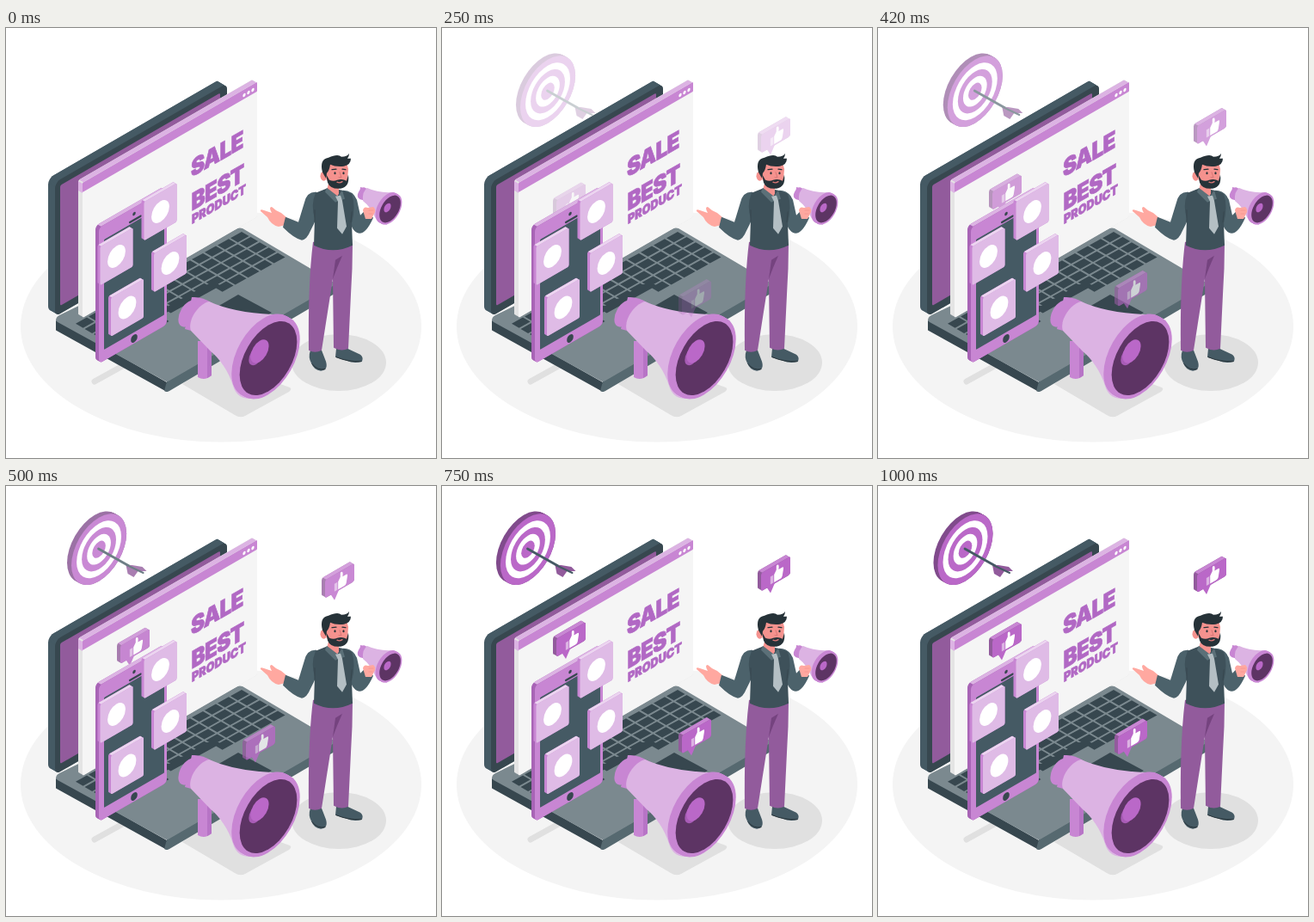
Animation, 500 px wide and 500 px high, one loop 1.04 s. Source, as an HTML page:

```html
<!DOCTYPE html>
<html lang="en">
<head>
<meta charset="utf-8">
<title>Best product sale</title>
<style>
  html, body { margin: 0; width: 100%; height: 100%; overflow: hidden; background: #fff; }
  svg { display: block; width: 100vw; height: 100vh; }
  text { font-family: Inter, "Open Sans", sans-serif; font-weight: 900; fill: #b168c4; stroke: #b168c4; stroke-width: .7; }
</style>
</head>
<body>
<svg id="stage" viewBox="0 0 500 500"></svg>
<script>
const SLOPE = 0.577;
const purple = '#ba68c8', mid = '#c886d3', pale = '#dcb3e3', deep = '#925b9c', plum = '#5d3464';
const ink = '#37474f', slate = '#455a64', night = '#263238', skin = '#ffa8a0', face = '#f5928e';

// Shapes on the left-facing isometric plane
const iso = (x, y) => `matrix(.866 -.5 0 1 ${x} ${y})`;
const path = (d, fill, extra = '') => `<path d="${d}" fill="${fill}" ${extra}/>`;
const line = (d, stroke, width) =>
  `<path d="${d}" fill="none" stroke="${stroke}" stroke-width="${width}" stroke-linecap="round" stroke-linejoin="round"/>`;
const ellipse = (x, y, rx, ry, fill) => `<ellipse cx="${x}" cy="${y}" rx="${rx}" ry="${ry}" fill="${fill}"/>`;
const disc = (x, y, r, fill) => `<circle r="${r}" transform="${iso(x, y)}" fill="${fill}"/>`;
const panel = (x, y, w, h, r, fill) =>
  `<rect width="${w / 0.866}" height="${h}" rx="${r}" transform="${iso(x, y)}" fill="${fill}"/>`;
const label = (x, y, size, spacing, words) =>
  `<text transform="${iso(x, y)}" font-size="${size}" letter-spacing="${spacing}">${words}</text>`;

// Repeats a shape from the rear position towards the viewer
function sweep(x, y, depth, shape) {
  let out = '';
  for (let i = 0; i <= depth; i++) out += shape(x + i, y + i * SLOPE);
  return out;
}

// A thick panel: (x, y) is the rear top-left corner, d the depth
function slab(x, y, w, h, d, r, front, side, top) {
  const x1 = x + r / 2, x2 = x + w - r / 2, y1 = y - r / 2 * SLOPE, y2 = y - (w - r / 2) * SLOPE, e = d * SLOPE;
  return sweep(x, y, d, (px, py) => panel(px, py, w, h, r, side)) +
    path(`M${x1} ${y1}L${x2} ${y2}L${x2 + d} ${y2 + e}L${x1 + d} ${y1 + e}Z`, top) +
    panel(x + d, y + e, w, h, r, front);
}

function keyboard() {
  let keys = '';
  for (let row = 0; row < 5; row++) {
    for (let col = 0; col < 13; col++) {
      if (row === 4 && col > 4 && col < 9) continue;
      keys += `M${274 + row * 10.5 - col * 15} ${237 + row * 6.1 + col * 8.3}l8.6 5l-13 7.2l-8.6 -5z`;
    }
  }
  return path(keys + 'M241 294.5l8.6 5l-58 32l-8.6 -5z', ink);
}

function laptop() {
  return path('M59 341L187 413V422L59 351Z', ink, `stroke="${ink}" stroke-width="2" stroke-linejoin="round"`) +
    path('M187 411L382 298V309L190 422Q187 424 184 422Z', '#566970') +
    path('M58 340Q58 336 62 334L269 233Q272 232 275 233L380 295Q384 298 380 300L190 410Q187 412 184 410L60 342Z', '#7b898f') +
    keyboard() + path('M270 310L309 331L270 354L232 332Z', ink) +
    slab(49, 175, 200, 156, 8, 7, ink, slate, slate) +
    panel(63, 183, 186, 140, 2, deep);
}

function browser() {
  const dots = [0, 1, 2].map(i => disc(277 + 5 * i, 78 - 3 * i, 1.9, '#fff')).join('');
  return slab(84, 177, 203, 157, 5, 2, '#f5f5f5', '#e4e4e4', pale) +
    path('M84 178L89 181V192L84 189Z', pale) + panel(89, 180, 203, 11, 1, mid) + dots +
    label(215, 174, 28, -0.7, 'SALE') + label(215.5, 213, 28, -0.7, 'BEST') + label(216, 228, 14.6, 0, 'PRODUCT');
}

const tile = (x, y) => slab(x, y, 38, 45, 3, 2, '#dfbbe6', mid, '#ecd5f0') + disc(x + 22, y + 13, 12, '#fff');

function phone() {
  return slab(104, 230, 79, 158, 4, 5, mid, '#a864b6', pale) +
    panel(114, 246, 70, 128, 1, slate) +
    line('M144 226L157 218.5', ink, 2.2) + disc(149, 216, 2, ink) + disc(149, 361, 4.4, ink) +
    tile(157.5, 200.5) + tile(106.5, 252.5) + tile(169, 260.5) + tile(119, 312);
}

function bigMegaphone() {
  return path('M223 364H239V404Q231 411 223 406Z', mid) + path('M234 372H239V404L234 407Z', '#b774c6') +
    path('M216 313Q228 312 240 320L229 353Q219 354 208 350Z', mid) + disc(212.5, 332, 14, mid) +
    path('M236 318Q265 331 309 333L335 340L282 431Q268 430 264 416C259 399 248 384 238 376L215 352C211 339 224 321 236 318Z', pale) +
    sweep(299.5, 380.5, 5, (x, y) => disc(x, y, 43, mid)) + disc(305, 384, 38.5, plum) +
    disc(291, 381, 10, '#a85cb6') + disc(295, 376, 12.2, purple);
}

function smallMegaphone() {
  return disc(414, 192, 6, mid) + path('M412 185L421 187L418 201L411 199Z', mid) +
    path('M420 186Q433 192 449 191L443 229Q433 228 429 220Q424 208 415 201Q414 190 420 186Z', pale) +
    sweep(443.5, 209, 3, (x, y) => disc(x, y, 16, mid)) + disc(446.5, 210.5, 14.2, plum) + disc(443.5, 209, 4.7, purple);
}

function man() {
  const shoes = path('M353 374H366L371 387Q374 397 365 398Q357 397 354 389Q350 382 353 374Z', slate) +
    path('M383 372H396L411 379Q415 382 413 387Q404 390 395 386L382 382Z', slate) +
    line('M355 390Q361 398 370 396M383 382Q397 388 412 387', night, 1);
  const legs = path('M356 248L402 250Q402 279 400 309L397 372Q389 376 380 371L379 291L366 374Q358 378 351 374Q350 297 356 248Z', deep) +
    path('M379 291L382 269L390 264L384 278Z', '#75437f');
  const openHand = path('M325 229L317 231Q308 229 304 220L296 213Q295 210 300 212L309 215Q305 208 309 208Q314 213 320 215L326 220Z', skin);
  const arms = path('M360 190Q349 189 346 202L339 225L324 219L321 231Q334 244 343 246Q349 245 353 235L364 213Z', '#4c626b') +
    path('M391 188Q402 188 407 199L411 217L418 210L426 220Q418 238 410 238Q401 237 398 220Z', '#4c626b');
  const torso = path('M359 191L374 185L390 188L401 192Q406 207 401 226L402 252Q379 263 357 252L358 221Q353 205 359 191Z', '#3e515a') +
    line('M358 211L358 224M401 213L400 225', ink, 1);
  const collar = path('M374 180L386 181V192L383 197L372 188Z', face) +
    path('M372 185L385 195L390 188L393 198L386 200L382 202L370 190Z', '#5b7078') +
    path('M382 195L388 194L390 200L395 230L390 239L384 232L385 201Z', '#b4bfc4');
  const head = path('M368 161Q370 151 384 152Q396 153 397 163L396 178Q391 186 380 183Q370 178 368 165Z', face) +
    ellipse(368.5, 171.5, 4, 5.5, face) +
    path('M367 167Q363 152 374 150Q385 145 389 149Q396 149 398 145Q398 149 396 151L400 151Q400 158 392 160Q382 161 376 158Q375 165 372 168L371 174Z', night) +
    path('M371 169L375 176Q380 178 384 176Q390 174 395 177L397 170Q399 184 388 186Q376 187 373 179Z', night) +
    ellipse(381.5, 168, 1.1, 1.5, night) + ellipse(391.5, 168, 1.1, 1.5, night) +
    line('M378 164L383 163.5M390 163.5L394 164', night, 1.2) +
    line('M387 167L389 173L386 173', '#d97775', 1) + line('M384 178.5Q387 180 390 178', '#d97775', 1.4);
  const grip = path('M415 212Q416 207 421 209L427 208Q431 211 428 216L425 222L418 222Z', skin) +
    line('M422 212L427 212M422 216L426 216', face, 0.8);
  return openHand + `<g transform="translate(1 .7)">${shoes + legs + arms + torso + collar + head}</g>` +
    smallMegaphone() + grip;
}

function target() {
  const rings = [37, 30, 23, 16, 9].map((r, i) => disc(101.5, 73.7, r, i % 2 ? '#fff' : purple)).join('');
  return sweep(96.5, 70.8, 5, (x, y) => disc(x, y, 37, '#804b8c')) + rings +
    line('M101 73L141 95.5', slate, 2.8) +
    path('M133 92L140 92L152 94L157 99L147 99L142 106L135 102Z', deep) + line('M134 92L153 101', slate, 2);
}

function bubble(x, y) {
  return slab(x, y, 34, 21, 4, 2.5, purple, deep, mid) +
    path(`M${x + 10} ${y + 18}l11 -6.5l-6 14z`, purple) +
    `<g transform="${iso(x + 14, y + 2)}">` +
    path('M1 5H5V14H1Z', pale) +
    path('M6 5L9 1V-3Q9 -5 11 -4Q13 -3 12 2H17Q19 2 18.5 4.5L17 12Q16.5 14 14 14H6Z', '#fff') + '</g>';
}

const stage = document.getElementById('stage');
stage.innerHTML =
  ellipse(250, 347, 233, 134.5, '#f4f4f4') +
  ellipse(387, 389, 55, 33, '#e0e0e0') +
  line('M103 411L150 385', '#e0e0e0', 7) +
  path('M205 414L240 385L330 418Q333 420 329 423L278 451Q272 454 266 450Z', '#e0e0e0') +
  laptop() + browser() +
  `<g class="rise">${bubble(129, 177)}</g>` +
  phone() + bigMegaphone() + man() +
  `<g class="rise">${bubble(275, 289.5)}</g>` +
  `<g class="rise">${bubble(367, 100.6)}</g>` +
  `<g class="slide">${target()}</g>`;

const risers = stage.querySelectorAll('.rise');
const slider = stage.querySelector('.slide');

// Ease with overshoot: cubic-bezier(.36, -.01, .5, 1.38)
const bezier = (a, b, s) => 3 * (1 - s) ** 2 * s * a + 3 * (1 - s) * s * s * b + s ** 3;
function ease(x) {
  let low = 0, high = 1;
  for (let i = 0; i < 24; i++) {
    const s = (low + high) / 2;
    if (bezier(0.36, 0.5, s) < x) low = s; else high = s;
  }
  return bezier(-0.01, 1.38, high);
}

const LOOP = 1040, STEPS = 25, TRAVEL = 30;

function render(time) {
  const step = Math.min(STEPS - 1, Math.floor((time % LOOP + 3) * STEPS / LOOP));
  const progress = ease((step + 1) / STEPS);
  const offset = TRAVEL * (1 - progress);
  const opacity = step ? Math.max(0, Math.min(1, progress)) : 0;
  for (const node of risers) {
    node.setAttribute('transform', `translate(0 ${offset})`);
    node.setAttribute('opacity', opacity);
  }
  slider.setAttribute('transform', `translate(${offset} 0)`);
  slider.setAttribute('opacity', opacity);
}

const start = performance.now();
function tick() {
  render(performance.now() - start);
  requestAnimationFrame(tick);
}
tick();
</script>
</body>
</html>
```
